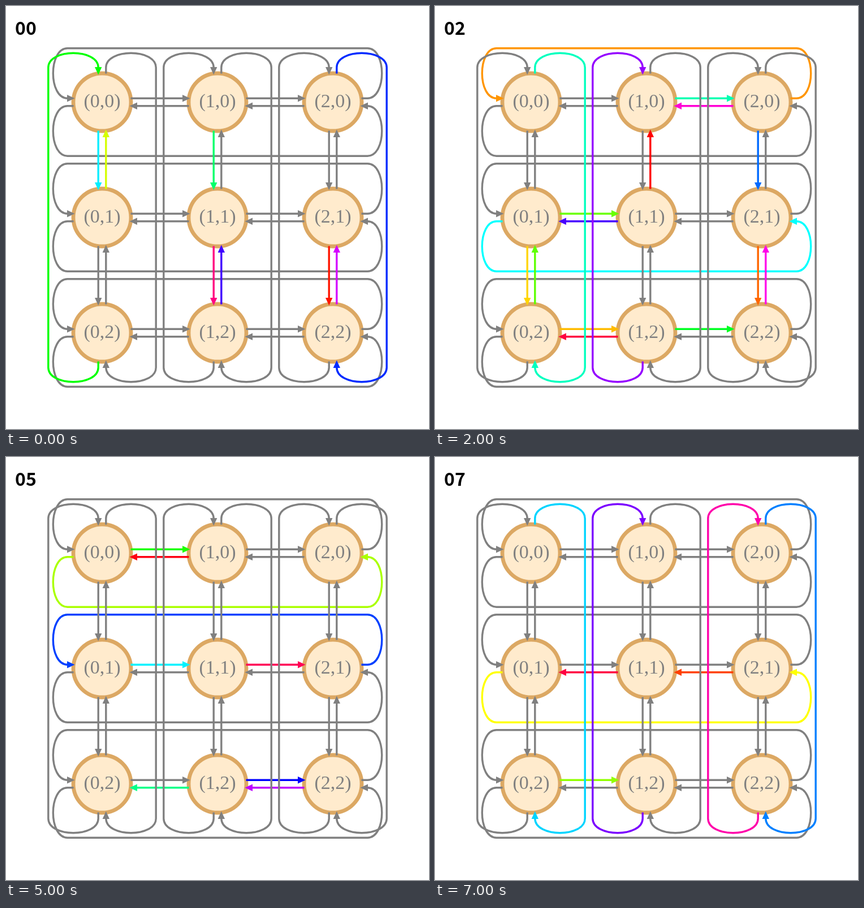
An HTML page that plays this animation: 748x748 px, repeating every 8 s.

```html
<!DOCTYPE html>
<html lang="en">
<head>
<meta charset="utf-8">
<title>Torus network traffic</title>
<style>
  html, body { margin: 0; width: 100%; height: 100%; overflow: hidden; background: #fff; }
  svg { display: block; width: 100vw; height: 100vh; }
  .node circle { fill: #ffebcd; stroke: #dca863; stroke-width: 6.8; }
  .node text { font: 34px "Liberation Serif", "Times New Roman", serif; fill: #808080; text-anchor: middle; }
  .edge { color: #808080; }
  .edge path { fill: none; stroke: currentColor; stroke-width: 3.4; }
  .edge polygon { fill: currentColor; }
  #step { font: bold 32px "Noto Sans CJK JP", "Noto Sans CJK SC", "Noto Sans", sans-serif; }
</style>
</head>
<body>
<svg id="stage" viewBox="0 0 748 748">
  <text id="step" x="16" y="51">00</text>
</svg>
<script>
const STEP_MS = 1000;

// Moves per step: column, row, direction, hue
const STEPS = [
  "00d184 01u70 10d145 11d330 12u255 21d5 22u290 02d120 20u230",
  "11u152 21d298 22d222 00d60 00u108 12u0 10r35 02l20 01r92",
  "00u165 20r35 10r162 20l310 11u0 20d215 01r95 11l257 01l180 02u98 01d50 12d275 02r44 12l345 12r128 21d24 22u305",
  "00u170 12d279 22d317 20u206 10r0 10l276 10d142 11u350 21u30 21r305 01l100 21l216 22r25 02l50 02r168",
  "00d180 01u81 02d110 10u150 10r277 20l30 20r316 20d225 11u355 11r138 12u250 22l206 21r20 22r306 02l171",
  "00r113 10l356 00l80 21r225 01r183 11r340 12l152 12r240 22l285",
  "21l343 02l314 01l18 10d30 11u183 20l80 12u205 00d357 22r240",
  "00u190 12d269 22d320 20u210 11l345 21l15 01l60 02r86"
].map(s => s.split(" ").map(m => [m.slice(0, 3), +m.slice(3)]));

const stage = document.getElementById("stage");
const label = document.getElementById("step");
const edges = {};

function add(parent, tag, attrs, text) {
  const el = document.createElementNS("http://www.w3.org/2000/svg", tag);
  for (const k in attrs) el.setAttribute(k, attrs[k]);
  if (text) el.textContent = text;
  return parent.appendChild(el);
}

const at = i => 170 + 204 * i;

// Every lane is drawn as a rightward one; these turn it to its direction
const DIRS = {
  r: { matrix: "1 0 0 1 0 0", cell: (c, r) => [c, r] },
  l: { matrix: "-1 0 0 -1 748 748", cell: (c, r) => [2 - c, 2 - r] },
  d: { matrix: "0 1 1 0 0 0", cell: (c, r) => [r, c] },
  u: { matrix: "0 -1 -1 0 748 748", cell: (c, r) => [2 - r, 2 - c] }
};

function addEdge(group, id, c, r) {
  const y = at(r) - 6.8, start = at(c) + 50.5;
  const wraps = c === 2, tip = at(wraps ? 0 : c + 1) - 48.4, base = tip - 13.6;
  const top = at(r) - 95.2;
  const d = wraps
    ? `M${start} ${y}H639.2C673.2 ${y} 673.2 ${top} 639.2 ${top}H108.8C74.8 ${top} 74.8 ${y} 108.8 ${y}H${base + 2}`
    : `M${start} ${y}H${base + 2}`;
  const g = edges[id] = add(group, "g", { class: "edge" });
  add(g, "path", { d });
  add(g, "polygon", { points: `${base},${y - 6.2} ${tip},${y} ${base},${y + 6.2}` });
}

function eachCell(fn) {
  for (let r = 0; r < 3; r++) for (let c = 0; c < 3; c++) fn(c, r);
}

eachCell((c, r) => {
  const g = add(stage, "g", { class: "node" });
  add(g, "circle", { cx: at(c), cy: at(r), r: 51 });
  add(g, "text", { x: at(c), y: at(r) + 9 }, `(${c},${r})`);
});

for (const k in DIRS) {
  const group = add(stage, "g", { transform: `matrix(${DIRS[k].matrix})` });
  eachCell((c, r) => addEdge(group, `${c}${r}${k}`, ...DIRS[k].cell(c, r)));
}

let shown = -1;

function show(n) {
  shown = n;
  label.textContent = "0" + n;
  for (const id in edges) edges[id].style.color = "";
  for (const [id, hue] of STEPS[n]) edges[id].style.color = `hsl(${hue}, 100%, 50%)`;
}

const t0 = performance.now();

function tick() {
  const n = Math.floor((performance.now() - t0) / STEP_MS) % STEPS.length;
  if (n !== shown) show(n);
  requestAnimationFrame(tick);
}
tick();
</script>
</body>
</html>
```
